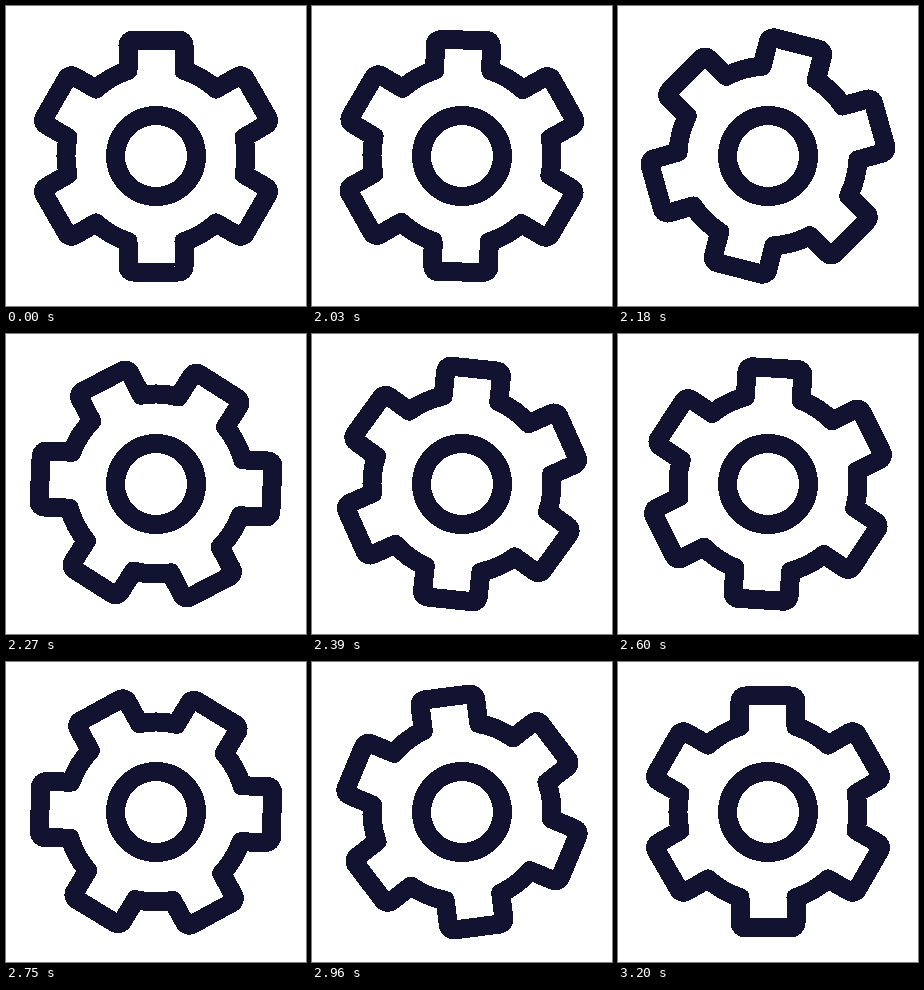
Recreate the animation shown at these times as an HTML page. Size 300x300 px, loop 3.26 s.

```html
<!DOCTYPE html>
<html lang="en">
<head>
<meta charset="utf-8">
<title>Turning gear</title>
<style>
  html, body { margin: 0; width: 100%; height: 100%; overflow: hidden; background: #fff; }
  svg { display: block; width: 100vw; height: 100vh; }
</style>
</head>
<body>
<svg viewBox="0 0 300 300" shape-rendering="crispEdges">
  <g transform="translate(150 150)" fill="none" stroke="#121331" stroke-width="19" stroke-linejoin="round">
    <path id="gear"/>
    <circle r="40.5"/>
  </g>
</svg>
<script>
const LOOP = 3260, HOLD = 2030, STEP = 30, LAST = 3200;
const START = 1988, END = 3210, TURN = 180;
const gear = document.getElementById('gear');

// One tooth is half as wide as HALF, from the body radius BODY up to TIP.
const HALF = 28, TIP = 116, BODY = 90, ROUND = 5.5;
const ROOT = Math.sqrt(BODY * BODY - HALF * HALF);

function outline() {
  let d = '';
  for (let k = 0; k < 6; k++) {
    const a = k * Math.PI / 3, c = Math.cos(a), s = Math.sin(a);
    const at = (x, y) => (x * c - y * s).toFixed(3) + ' ' + (x * s + y * c).toFixed(3);
    const arc = (r, x, y) => `A${r} ${r} 0 0 1 ${at(x, y)}`;
    d += k ? arc(BODY, -HALF, -ROOT) : 'M' + at(-HALF, -ROOT);
    d += 'L' + at(-HALF, ROUND - TIP) + arc(ROUND, ROUND - HALF, -TIP);
    d += 'L' + at(HALF - ROUND, -TIP) + arc(ROUND, HALF, ROUND - TIP);
    d += 'L' + at(HALF, -ROOT);
  }
  return d + `A${BODY} ${BODY} 0 0 1 ${-HALF} ${-ROOT}Z`;
}

// Cubic Bezier ease (0.35, 0, 0.37, 1), solved by bisection.
function ease(x) {
  let lo = 0, hi = 1;
  for (let i = 0; i < 30; i++) {
    const s = (lo + hi) / 2, r = 1 - s;
    const bx = 3 * 0.35 * s * r * r + 3 * 0.37 * s * s * r + s * s * s;
    if (bx < x) lo = s; else hi = s;
  }
  return lo * lo * (3 - 2 * lo);
}

function angle(t) {
  if (t < HOLD) return 0;
  const tick = Math.min(LAST, HOLD + Math.floor((t - HOLD) / STEP) * STEP);
  return TURN * ease((tick - START) / (END - START));
}

function draw(t) {
  gear.setAttribute('transform', `rotate(${angle(t % LOOP).toFixed(3)})`);
}

gear.setAttribute('d', outline());
draw(0);
const t0 = performance.now();
(function frame() {
  draw(performance.now() - t0);
  requestAnimationFrame(frame);
})();
</script>
</body>
</html>
```
